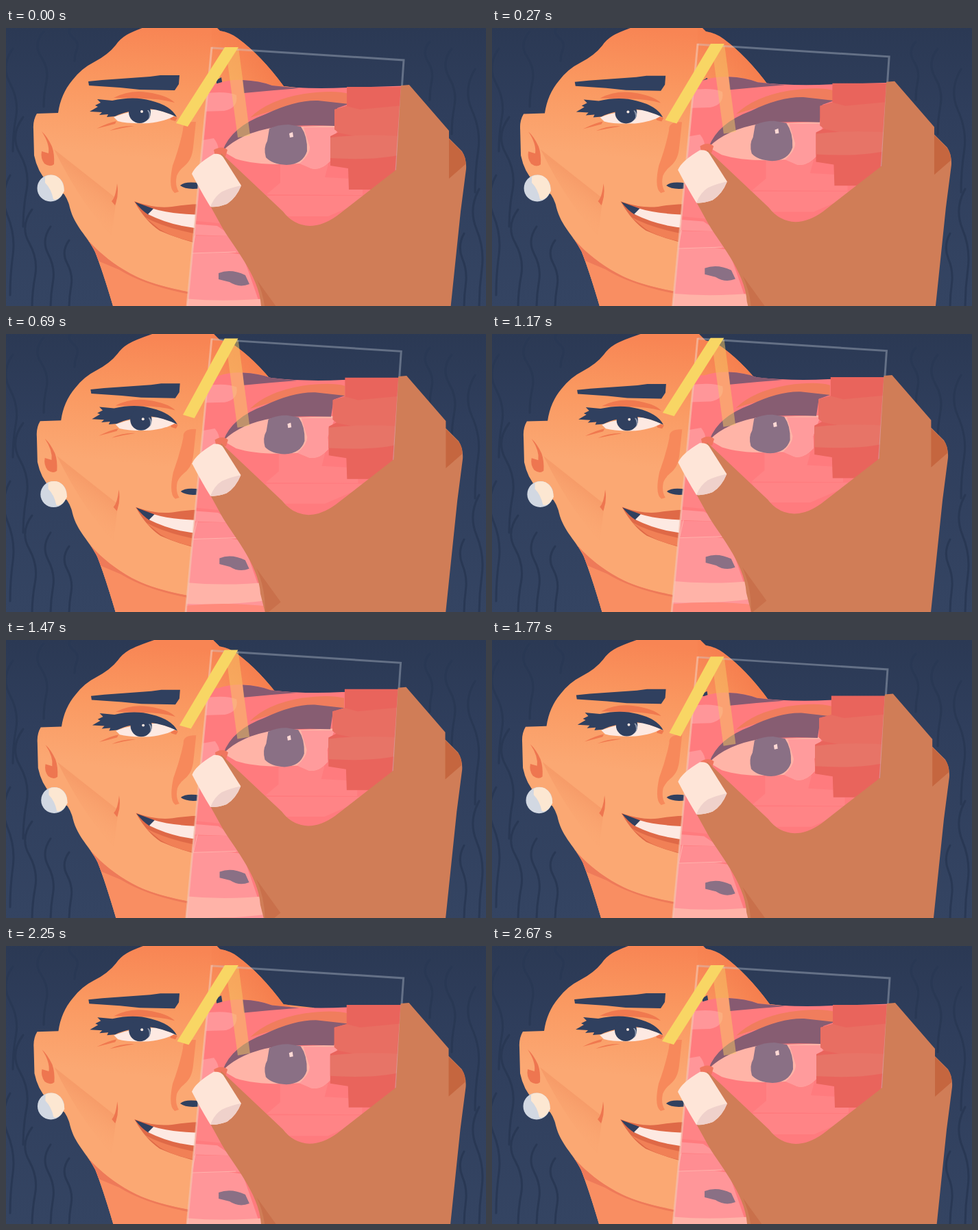
Recreate the animation shown at these times as an HTML page. Size 700 by 406 pixels, loop 2.7 s.

```html
<!DOCTYPE html>
<html>
<head>
<meta charset="utf-8">
<style>
  html, body { margin: 0; width: 100%; height: 100%; overflow: hidden; background: #30405f; }
  svg { display: block; width: 700px; height: 406px; }
</style>
</head>
<body>
<svg viewBox="0 0 700 406">
  <defs>
    <linearGradient id="night" x2="0" y2="1">
      <stop stop-color="#2b3954"/><stop offset=".3" stop-color="#2f3e5c"/><stop offset="1" stop-color="#344462"/>
    </linearGradient>
    <linearGradient id="skin" gradientUnits="userSpaceOnUse" x1="215" y1="0" x2="195" y2="190">
      <stop stop-color="#f88554"/><stop offset=".45" stop-color="#fa9860"/><stop offset="1" stop-color="#fba873"/>
    </linearGradient>
    <linearGradient id="cheek" gradientUnits="userSpaceOnUse" x1="130" y1="225" x2="105" y2="260">
      <stop stop-color="#f2905f" stop-opacity=".5"/><stop offset="1" stop-color="#f9a06c" stop-opacity=".1"/>
    </linearGradient>
    <linearGradient id="temple" gradientUnits="userSpaceOnUse" x1="385" y1="40" x2="310" y2="75">
      <stop stop-color="#f57d4d"/><stop offset="1" stop-color="#f57d4d" stop-opacity="0"/>
    </linearGradient>
    <clipPath id="pane"><path d="M300 28L580 47L569 208L500 460H259Z"/></clipPath>
    <clipPath id="face"><path d="M228 -10Q190 2 176 10Q166 16 160 25Q149 39 128 50Q110 59 97 76Q80 96 76 124L45 125Q39 135 40 148L41 186Q46 210 60 224L85 243Q91 252 93 262C100 290 119 304 130 327Q143 360 163 430H450V90L405 85Q372 40 338 15Q328 7 312 4L298 -10Z"/></clipPath>
  </defs>

  <rect width="700" height="406" fill="url(#night)"/>
  <g id="strands" fill="none" stroke="#293854" stroke-width="3" stroke-linecap="round"></g>

  <g id="head">
    <g clip-path="url(#face)">
      <rect x="30" y="-10" width="420" height="450" fill="url(#skin)"/>
      <path d="M300 -8H340L420 95H300Z" fill="url(#temple)"/>
      <path d="M70 177L161 249L154 304Q108 255 70 177Z" fill="url(#cheek)"/>
      <path d="M90 255C100 300 143 340 190 363Q225 380 300 391V440H80Z" fill="#f98e62"/>
      <path d="M92 265C104 300 143 340 190 363Q225 380 300 391V394Q212 382 165 353L134 340L100 320Z" fill="#ee7a59"/>
    </g>
    <path d="M52 151Q60 158 67 173Q71 184 70 199Q64 204 56 198Q50 190 52 180L62 183Q64 169 52 151Z" fill="#ee7650"/>
    <path d="M162 227Q165 244 159 259L154 253Q160 247 162 227Z" fill="#ee7650"/>
    <g fill="#f0794f">
      <path d="M277 137Q257 136 258 149Q253 174 243 201Q236 234 246 241L252 239Q246 230 249 216C256 199 270 203 273 174Z" fill="#f7895b"/>
      <path d="M157 102Q180 90 206 94Q235 98 246 109Q224 103 198 103Z"/>
      <path d="M132 147Q150 138 161 136L159 140Q148 143 132 147ZM151 150Q168 142 187 143Q168 146 151 150Z"/>
      <path d="M238 127L250 131L247 136L240 134Z"/>
    </g>
    <path d="M120 78L140 76L210 71L225 69L253 69L252 82L246 91L195 90L166 87L121 84Z" fill="#30405f"/>
    <path d="M157 130Q184 119 220 119L246 128Q234 136 208 139Q177 140 163 136Z" fill="#fde9e2"/>
    <path d="M122 122L134 115L130 113L138 109L133 104L155 106Q186 99 211 106Q240 113 249 130Q228 120 209 118Q177 120 159 129L147 130L149 126L136 127L140 123Z" fill="#30405f"/>
    <circle cx="195" cy="123" r="16" fill="#30405f"/>
    <path d="M208 120Q214 126 207 135Q211 127 206 120Z" fill="#8d97ab"/>
    <circle cx="198" cy="122" r="2" fill="#fde9e2"/>
    <path d="M307 76L314 72L316 84H307Z" fill="#30405f"/>
    <path d="M254 230Q262 223 284 227V234Q263 237 254 230Z" fill="#30405f"/>
    <path d="M187 253Q216 264 242 261Q265 257 290 257V317Q253 309 224 296Q203 282 187 253Z" fill="#df6947"/>
    <path d="M202 276Q235 294 290 303V314Q250 310 224 294Z" fill="#f18056"/>
    <path d="M188 254L215 264L208 273Q197 266 188 254Z" fill="#30405f"/>
    <path d="M215 264Q240 272 290 273V293Q245 291 207 272Z" fill="#fde9e2"/>
    <circle cx="65" cy="234" r="19.5" fill="#d2d8e2"/>
    <path d="M57 217Q64 213 73 216Q84 222 85 238Q77 253 69 250Q66 235 57 226Z" fill="#fce7d2"/>
  </g>

  <g id="hand">
    <g clip-path="url(#pane)">
      <g id="lens">
        <path d="M250 83L308 81Q326 75 346 76Q370 77 388 84Q440 90 497 87L600 84V500H240Z" fill="#ff7b7e"/>
        <path d="M345 76Q370 77 388 84L428 88Q388 91 347 95Z" fill="#875a71"/>
        <g fill="#ff9699">
          <path d="M285 96Q320 91 336 98Q339 117 318 121L285 122Z"/>
          <path d="M280 165L303 161Q318 180 300 195L275 205Z"/>
          <path d="M270 286L308 289L330 304L268 302Z"/>
          <path d="M260 329L318 327L345 331L390 460H250Z"/>
        </g>
        <g fill="#ff8486">
          <path d="M400 199H470L465 218L520 221V244L380 243L400 226Z"/>
          <path d="M260 220L290 216L320 286L260 280Z"/>
          <path d="M380 245H540L470 275H400Z"/>
        </g>
        <path d="M268 303L330 304L345 328L260 329Z" fill="#ff8d92"/>
        <path d="M258 395Q320 401 390 394V421Q320 431 250 427Z" fill="#ffb3a8"/>
        <path d="M250 431Q320 423 390 432V500H250Z" fill="#ff8a7b"/>
        <path d="M276 302L270 329L335 327" fill="none" stroke="#ffb3ad"/>
        <path d="M356 131Q382 105 435 96Q478 90 500 96V112Q440 103 356 131Z" fill="#f07d5d"/>
        <path d="M316 180Q338 156 376 146L485 142L474 174L475 192Q460 209 445 205L430 198Q370 202 335 191Z" fill="#ffb4a7"/>
        <path d="M434 145H485L474 174L475 192Q460 209 445 205L428 198Q443 185 443 174Z" fill="#ff9b9c"/>
        <path d="M316 179Q329 144 378 126Q422 105 455 106L500 111L483 117L479 143Q430 141 392 145Q343 153 316 179Z" fill="#875d72"/>
        <path d="M384 147Q396 141 412 141L430 144Q440 158 439 180Q433 199 409 200Q388 199 379 189Q375 175 381 165Z" fill="#8a7085"/>
        <path d="M413 154L418 152L419 159L414 160Z" fill="#ffd9d5"/>
        <path d="M303 178Q315 171 323 178L320 188L305 187Z" fill="#f0765f"/>
        <path d="M310 358Q328 351 349 361L355 374Q340 380 326 371L310 367Z" fill="#8a7085"/>
      </g>
      <path d="M497 86H600V205L569 236H500L499 205L473 201V158L485 152L479 148V119L497 114Z" fill="#e9645c"/>
      <path d="M497 114L516 119L580 113V158L520 160L485 153L479 148V119Z" fill="#e86e62"/>
      <path d="M473 160Q520 154 580 158V184Q540 194 473 190Z" fill="#e77467"/>
      <path d="M320 28H339L356 157L338 160Z" fill="#f8c866" opacity=".5"/>
    </g>
    <path d="M300 29L580 47L569 208" fill="none" stroke="#c7d1dc" stroke-opacity=".36" stroke-width="3"/>
    <path d="M300 28L259 460" fill="none" stroke="#f5c9b5" stroke-opacity=".6" stroke-width="3"/>
    <path id="ray" fill="#f8d664"/>

    <path d="M314 183L404 268Q419 288 443 289Q462 289 483 274L569 207L576 84L588 83L646 150V161L665 180Q672 191 671 206L663 268L642 470H388L372 406C370 362 328 315 314 289L298 260Z" fill="#d07d57"/>
    <path d="M646 162L665 181Q671 189 670 199L646 220Z" fill="#c5663f"/>
    <path d="M366 368L402 418L379 437Q380 398 366 368Z" fill="#c9704b"/>
    <path d="M271 213Q276 200 303 184Q313 183 317 189L343 230Q336 248 322 257Q309 262 298 261Q285 240 271 213Z" fill="#fee5d8"/>
    <path d="M343 230Q336 248 322 257Q309 262 298 261Q304 246 315 239Q328 233 343 230Z" fill="#efd1cb"/>
  </g>
</svg>
<script>
const el = id => document.getElementById(id);
const LOOP = 2700;

// Wavy locks: x, top, bottom, sway
const locks = [
  [10, 30, 180, 9], [25, 130, 290, 10], [6, 215, 390, 8], [38, 265, 410, 9], [65, 290, 410, 7],
  [92, 310, 410, 6], [55, 5, 115, 8], [100, -5, 48, 7], [618, 20, 105, 6],
  [650, 30, 155, 8], [684, 60, 240, 9], [690, 235, 410, 8], [668, 300, 410, 5]
];
el('strands').innerHTML = locks.map(([x, top, bottom, sway]) => {
  const step = (bottom - top) / 3;
  return `<path d="M${x} ${top}q${-sway * 2} ${step / 2} ${-sway / 2} ${step}t${sway} ${step}t${-sway / 2} ${step}"/>`;
}).join('');

const ease = (t, from, to) => {
  const x = Math.min(1, Math.max(0, (t - from) / (to - from)));
  return (1 - Math.cos(Math.PI * x)) / 2;
};
const place = (id, x, y, sx, sy, dy = 0) => el(id).setAttribute('transform',
  `translate(${x} ${y + dy}) scale(${sx} ${sy}) translate(${-x} ${-y})`);

function draw(now) {
  const t = now % LOOP;
  const depth = ease(t, 0, 960) - ease(t, 1350, 2450);
  const lift = ease(t, 0, 900) - ease(t, 950, 2060);
  const lag = ease(t, 1200, 1800) - ease(t, 2000, 2500);
  const swing = t < 2400 ? (1 - Math.cos(2 * Math.PI * t / 1200)) / 2 : 0;
  const headScale = 1 - .024 * depth, handScale = 1 - .0162 * depth;

  place('head', 290, 234, headScale, headScale);
  place('hand', 300, 28, handScale, handScale, -24.5 * lift);
  place('lens', 370, 170, 1 - .03 * depth, 1 - .03 * lift, 5 * lag);
  const x = 248 + 10 * swing, y = 139 + 2 * swing;
  el('ray').setAttribute('d', `M319 28H339L${x + 17} ${y + 5}L${x} ${y}Z`);
  requestAnimationFrame(draw);
}
requestAnimationFrame(draw);
</script>
</body>
</html>
```
